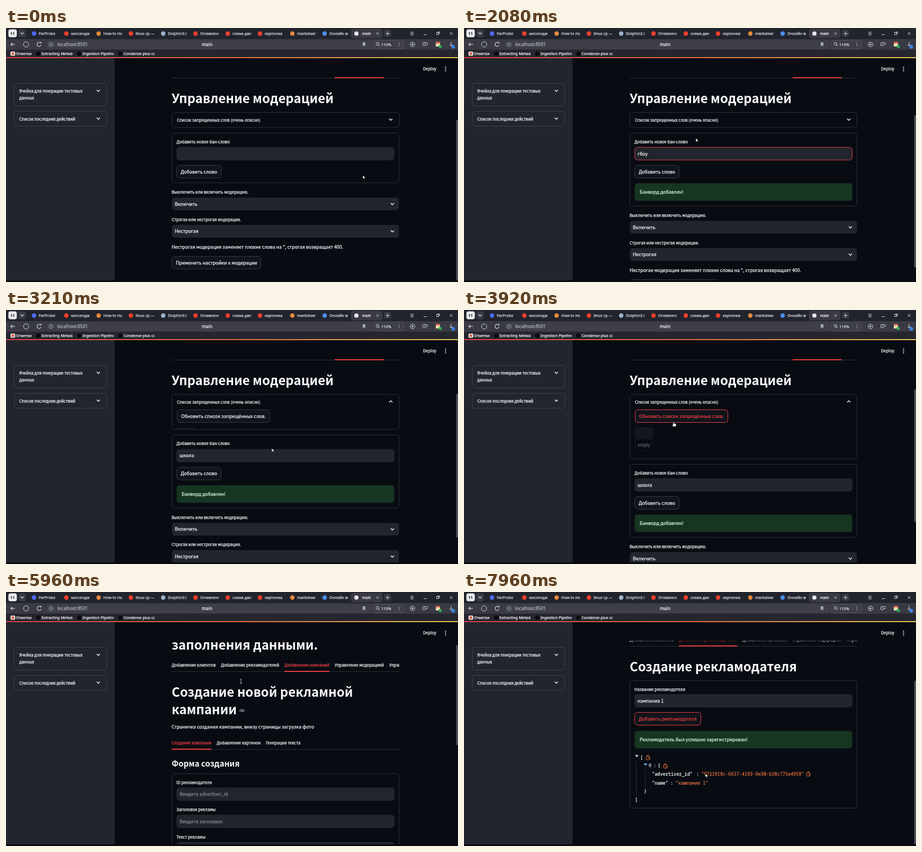
These frames come from a looping animation (854x480 px, 8 s). An HTML page with a canvas:

```html
<!DOCTYPE html>
<html lang="ru">
<head>
<meta charset="utf-8">
<title>main</title>
<style>
html, body { margin: 0; width: 100%; height: 100%; overflow: hidden; background: #080c12; }
canvas { display: block; width: 854px; height: 480px; }
</style>
</head>
<body>
<canvas id="stage" width="854" height="480"></canvas>
<script>
const LOOP = 8000;
const c = document.getElementById('stage').getContext('2d');
const BG = '#080c12', PANEL = '#22252d', EDGE = '#2b2f37', INK = '#f8f9fa', RED = '#e83f41',
      GREEN = '#163622', ORANGE = '#e8703a', DIM = '#858991';
const UI = '"Noto Sans", "Open Sans", sans-serif';
const MONO = '"Noto Sans Mono", "DejaVu Sans Mono", monospace';
const TOP = 57, BOTTOM = 477, HEADER = 92.5;

// Page typeface: use the CJK family only if its Cyrillic is proportional.
const measure = (str, font) => { c.font = font; return c.measureText(str).width; };
const CJK = '"Noto Sans CJK JP", "Noto Sans", sans-serif';
const PAGE = Math.abs(measure('г', '100px ' + CJK) - measure('ш', '100px ' + CJK)) < 9 ? UI : CJK;
// Size adjustment per weight, like CSS size-adjust.
const adjust = {
  400: 33.1 / measure('Нестрогая модерация заменяет плохие слова на *, строгая возвращает 400.', '400 1000px ' + PAGE) * 1000,
  700: 11.38 / measure('Управление модерацией', '700 1000px ' + PAGE) * 1000
};
const SMALL = 8.56, BODY = 9.79, TITLE = 26.9;

function put(str, x, y, size, color = INK, font = UI, weight = 400) {
  c.font = `${weight} ${size}px ${font}`;
  c.fillStyle = color;
  c.fillText(str, x, y);
  if (weight === 400) {
    // A hairline outline gives small text its slightly heavier look.
    c.strokeStyle = color;
    c.lineWidth = .25;
    c.strokeText(str, x, y);
  }
}
// y is the middle of the capitals
const text = (str, x, y, size = BODY, color = INK, weight = 400) =>
  put(str, x, y + size * .33, size * adjust[weight], color, PAGE, weight);
const ui = (str, x, y, size = 7, color = '#dddee2') => put(str, x, y + size * .35, size, color);
const mono = (str, x, y, color = INK) => put(str, x, y + 3, 8.55, color, MONO);

function rect(x, y, w, h, fill) { c.fillStyle = fill; c.fillRect(x, y, w, h); }
function box(x, y, w, h, fill, stroke, r = 5) {
  c.beginPath();
  c.roundRect(x + .5, y + .5, w - 1, h - 1, r);
  if (fill) { c.fillStyle = fill; c.fill(); }
  if (stroke) { c.strokeStyle = stroke; c.lineWidth = 1; c.stroke(); }
}
function line(points, color = INK, width = 1) {
  c.beginPath();
  points.forEach(([x, y]) => c.lineTo(x, y));
  c.strokeStyle = color; c.lineWidth = width; c.stroke();
}
function shape(points, fill, stroke) {
  c.beginPath();
  points.forEach(([x, y]) => c.lineTo(x, y));
  c.closePath();
  c.fillStyle = fill; c.fill();
  if (stroke) { c.strokeStyle = stroke; c.lineWidth = .8; c.stroke(); }
}
function dot(x, y, r, fill, stroke) {
  c.beginPath();
  c.arc(x, y, r, 0, Math.PI * 2);
  if (fill) { c.fillStyle = fill; c.fill(); }
  if (stroke) { c.strokeStyle = stroke; c.lineWidth = 1; c.stroke(); }
}
function clipped(x, y, w, h, draw) {
  c.save();
  c.beginPath(); c.rect(x, y, w, h); c.clip();
  draw();
  c.restore();
}
const chevron = (x, y, up, color = INK) => {
  const d = up ? -1.5 : 1.5;
  line([[x - 3, y - d], [x, y + d], [x + 3, y - d]], color, 1.4);
};

// ---- Time helpers ----
function track(t, keys) {
  const i = keys.findIndex(k => k[0] > t);
  if (i < 0) return keys[keys.length - 1].slice(1);
  if (i === 0) return keys[0].slice(1);
  const a = keys[i - 1], b = keys[i], p = (t - a[0]) / (b[0] - a[0]);
  const e = p * p * (3 - 2 * p);
  return a.slice(1).map((v, n) => v + (b[n + 1] - v) * e);
}
const typed = (str, t, from, to) =>
  str.slice(0, Math.max(0, Math.ceil((t - from) / (to - from) * str.length)));
const between = (t, a, b) => t >= a && t < b;

const SCROLL = [[0, 167], [5040, 167], [5240, 0], [5790, 0], [5950, 111], [6250, 111], [6440, 0],
  [7620, 0], [7830, 159]];
const POINTER = [[0, 674, 278], [100, 674, 278], [420, 450, 238], [1620, 450, 238], [1900, 438, 208],
  [2850, 438, 208], [3090, 500, 176], [3130, 500, 176], [3205, 502, 261], [3260, 502, 261],
  [3700, 396, 211], [4250, 396, 211], [4650, 430, 300], [5020, 430, 300], [5260, 505, 190],
  [5320, 505, 190], [5540, 568, 250], [5680, 568, 250], [5920, 444, 169], [6250, 444, 169],
  [6520, 461, 250], [6640, 461, 250], [6830, 440, 365], [7330, 440, 365], [7460, 385, 400],
  [7600, 385, 400], [7900, 456, 343]];
const CARETS = [[330, 1680], [5230, 5430], [5850, 6400], [6800, 7370]];
const HANDS = [[3060, 3170], [3600, 4380], [5470, 5730], [6480, 6690], [7420, 7680]];
const during = (spans, t) => spans.some(([a, b]) => between(t, a, b));

// ---- Page widgets ----
function button(label, x, y, w, hot) {
  box(x, y, w, 25, '#10141c', hot ? RED : '#343840');
  text(label, x + 8, y + 12.5, BODY, hot ? RED : INK);
}
function input(y, value, focus, hint) {
  box(322, y, 412, 25, PANEL, focus ? '#d24040' : PANEL);
  text(value || hint || '', 328, y + 12.5, BODY, value ? INK : DIM);
}
function select(label, value, y) {
  text(label, 313, y, SMALL);
  box(313, y + 9.5, 430, 25, PANEL);
  text(value, 319, y + 22, BODY);
  chevron(730, y + 22);
}
function alertBox(label, y) {
  box(322, y, 412, 34, GREEN);
  text(label, 332, y + 17, BODY, '#e2f7e6');
}
function tabs(items, y, active) {
  rect(313, y + 12, 430, 1, EDGE);
  clipped(313, y - 10, 430, 30, () => items.forEach(([x, label], i) => {
    text(label, x, y, SMALL, i === active ? RED : INK);
    if (i === active) rect(x, y + 11, c.measureText(label).width, 2, RED);
  }));
}
function linkIcon(x, y) {
  box(x - 5, y - 2.5, 6, 5, null, '#9a9ca2', 2.5);
  box(x - 1, y - 2.5, 6, 5, null, '#9a9ca2', 2.5);
  rect(x - 2.5, y - .5, 5, 1, '#9a9ca2');
}
function clipboard(x, y) {
  box(x - 4, y - 3.5, 7, 8, null, ORANGE, 1);
  rect(x - 2, y - 4.5, 3, 2, ORANGE);
  line([[x + 4, y + 1], [x - 1, y + 1]], ORANGE);
}

function pageHead(t, active) {
  tabs([[313, 'Страница аналитики'], [402, 'Добавление данных'], [487, 'Информация / Инструкция']], 127, 1);
  box(317, 164, 28, 28, '#e8edf0', '#c3ccd2', 2);
  rect(319, 171, 7, 19, '#2fa56b');
  rect(327, 178, 7, 12, '#e0484c');
  rect(336, 167, 7, 23, '#3d94d6');
  text('KVUN', 356, 179, TITLE, INK, 700);
  text('- Дашборд для', 429, 179, TITLE, INK, 700);
  text('заполнения данными.', 313, 211, TITLE, INK, 700);
  if (between(t, 5230, 5400)) linkIcon(599, 213);
  tabs([[313, 'Добавление клиентов'], [406, 'Добавление рекламодателей'], [526, 'Добавление кампаний'],
    [621, 'Управление модерацией'], [724, 'Управление показами']], 249, active);
}

function wordTable(filled) {
  const y = 389, row = 21.4;
  if (!filled) {
    box(323, y, 34, 44, null, '#15181f', 3);
    rect(324, y + 1, 32, 21, '#14161d');
    return text('empty', 328, y + 33, SMALL + .4, '#5d6067');
  }
  box(323, y, 80, row * 5, BG, EDGE, 3);
  rect(324, y + 1, 78, row - 1, '#191c23');
  rect(357, y, 1, row * 5, EDGE);
  text('banwords', 361, y + 11, SMALL, DIM);
  ['prooood', 'гбоу', 'сош', 'школа'].forEach((word, i) => {
    const mid = y + row * (i + 1.52);
    rect(323, y + row * (i + 1), 80, 1, EDGE);
    text(String(i), 347, mid, SMALL, DIM);
    text(word, 361, mid, SMALL);
  });
}

function moderation(t) {
  const filled = t >= 4080, alert = t >= 1790;
  const open = Math.min(1, Math.max(0, (t - 3130) / 200));
  const grown = open * 93 + (filled ? 63 : 0);
  text('Управление модерацией', 313, 300.5, TITLE, INK, 700);

  box(313, 326, 430, 29.5 + grown, null, EDGE);
  text('Список запрещенных слов (очень опасно)', 323, 341, SMALL);
  chevron(727, 340, open > 0);
  if (open > 0) clipped(314, 350, 428, 4 + grown, () => {
    button('Обновить список запрещённых слов.', 323, 355, 176, t >= 3610);
    wordTable(filled);
  });

  c.save();
  c.translate(0, grown);
  box(313, 365, 430, alert ? 139 : 95, null, EDGE);
  text('Добавить новое бан-слово', 322, 382, SMALL);
  const word = t < 2250 ? typed('гбоу', t, 850, 1550)
    : t < 2580 ? typed('сош', t, 2250, 2400) : typed('школа', t, 2580, 2840);
  input(392, word, between(t, 440, 3130));
  button('Добавить слово', 322, 426, 85);
  if (alert) { alertBox('Банворд добавлен!', 460); c.translate(0, 44); }
  select('Выключить или включить модерацию.', 'Включить', 477.5);
  select('Строгая или нестрогая модерация.', 'Нестрогая', 529);
  text('Нестрогая модерация заменяет плохие слова на *, строгая возвращает 400.', 313, 581);
  button('Применить настройки к модерации', 313, 598, 169);
  c.restore();
  return 585 + (alert ? 44 : 0) + grown;
}

function campaign(t) {
  text('Создание новой рекламной', 313, 300.5, TITLE, INK, 700);
  text('кампании', 313, 333, TITLE, INK, 700);
  if (between(t, 5860, 6300)) linkIcon(446, 335);
  text('Страничка создания кампании, внизу страницы загрузка фото', 313, 366);
  tabs([[313, 'Создание кампании'], [398, 'Добавление картинок'], [491, 'Генерация текста']], 396, 0);
  text('Форма создания', 313, 435, 17, INK, 700);
  box(313, 454, 430, 400, null, EDGE);
  [['ID рекламодателя', 'Введите advertiser_id'], ['Заголовок рекламы', 'Введите заголовок'],
    ['Текст рекламы', 'Введите текст']].forEach(([label, hint], i) => {
    const y = 471 + i * 51.4;
    text(label, 322, y, SMALL);
    input(y + 9.5, '', false, hint);
  });
  return 957;
}

function advertiser(t) {
  const done = t >= 7550;
  text('Создание рекламодателя', 313, 300.5, TITLE, INK, 700);
  box(313, 326, 430, done ? 242 : 95, null, EDGE);
  text('Название рекламодателя', 322, 343, SMALL);
  input(352, typed('кампания 1', t, 6900, 7320), between(t, 6850, 7490));
  button('Добавить рекламодателя', 322, 386, 126, t >= 7420);
  if (!done) return 430;

  alertBox('Рекламодатель был успешно зарегистрирован!', 421);
  rect(325, 478, 1, 66, EDGE);
  rect(342, 494, 1, 36, EDGE);
  shape([[323, 467], [330, 467], [326.5, 471.5]], '#a9c6d8');
  shape([[339.5, 483], [346.5, 483], [343, 487.5]], '#55b4e4');
  mono('[', 333, 472); clipboard(348, 472);
  mono('0', 349, 487, '#b7bac0'); mono(':', 358, 487); mono('{', 366, 487); clipboard(381, 488);
  mono('"advertiser_id"', 355, 503); mono(':', 439, 503);
  mono('"9721918c-6637-4193-9e30-b38c775e4958"', 448, 503, ORANGE); clipboard(651, 503);
  mono('"name"', 355, 520); mono(':', 390, 520); mono('"кампания 1"', 400, 520, ORANGE);
  mono('}', 340, 536); mono(']', 323, 552);
  return 586;
}

function page(t) {
  rect(205, TOP, 649, 423, BG);
  const [scroll] = track(t, SCROLL);
  c.save();
  c.translate(0, -scroll);
  const view = t < 5600 ? moderation : t < 6600 ? campaign : advertiser;
  pageHead(t, view === moderation ? 3 : view === campaign ? 2 : 1);
  const height = view(t);
  c.restore();
  if (height > 430)
    box(850, 50 + scroll * 430 / height, 5, 430 * 423 / height, '#4b4e56', null, 2);
  rect(205, TOP, 649, HEADER - TOP, BG);
  text('Deploy', 788, 77.5, SMALL);
  [-3.5, 0, 3.5].forEach(d => dot(830.5, 77.5 + d, 1.1, INK));
}

function sidebar() {
  rect(0, TOP, 205, 423, PANEL);
  box(15, 104, 176, 44, null, '#41444c');
  text('Ячейка для генерации тестовых', 25, 119.5, SMALL);
  text('данных', 25, 132.5, SMALL);
  chevron(174.5, 118.5);
  box(15, 157, 176, 29, null, '#41444c');
  text('Список последних действий', 25, 172, SMALL);
  chevron(174.5, 171);
}

// ---- Browser frame ----
const SITE = '#f0402c', ASK = '#e58a3c';
const STRIP = '#22242d', BAR = '#393a43', FIELD = '#3e3f48', MARKS = '#25262e';
const BROWSER_TABS = ['FarProbe #4d6bfe', 'мессенджер ' + SITE, 'How to make ' + ASK, 'linux cp — ' + SITE,
  'Dolphin3.0 #9fb4cf', 'Оглавление ' + SITE, 'схема данных ' + SITE, 'картинка к ' + SITE,
  'markdown ' + ASK, 'Онлайн вид #4b8ff0'];

function browser() {
  const pale = '#d3d5da';
  rect(0, 0, 854, 21, STRIP);
  rect(0, 21, 854, 20, BAR);
  rect(0, 41, 854, 15, MARKS);
  box(4, 2, 17, 16, '#e9eaec', null, 4);
  put('11', 8, 12.7, 7.5, '#17181e', UI, 700);
  box(23, 2, 15, 16, BAR, null, 4);
  chevron(30.5, 10, false, pale);
  BROWSER_TABS.forEach((entry, i) => {
    const cut = entry.lastIndexOf(' '), x = 53 + i * 61;
    dot(x, 10.5, 4.2, entry.slice(cut + 1));
    clipped(x + 8, 2, 36, 18, () => ui(entry.slice(0, cut), x + 9, 10.5, 7.3));
  });
  box(651, 1, 61, 19, BAR, null, 5);
  dot(662, 10.5, 4, '#e6e7e9');
  ui('main', 673, 10.5, 7, '#fff');
  const cross = (x, y, r) => {
    line([[x - r, y - r], [x + r, y + r]], pale);
    line([[x - r, y + r], [x + r, y - r]], pale);
  };
  cross(702, 10.5, 2);
  box(714, 3, 14, 14, BAR, null, 4);
  line([[717.5, 10.5], [724.5, 10.5]], pale);
  line([[721, 7], [721, 14]], pale);
  [8, 10.5, 13].forEach(y => line([[764, y], [770, y]], pale));
  line([[789, 12.5], [795, 12.5]], pale);
  box(813, 8, 5, 5, null, pale, 0);
  line([[815, 7.5], [819, 7.5], [819, 11.5]], pale);
  cross(841, 10.5, 2.5);

  line([[17, 31], [9, 31]], pale, 1.2);
  line([[12, 28], [9, 31], [12, 34]], pale, 1.2);
  dot(38, 31, 5, null, pale);
  c.beginPath(); c.arc(62.5, 31, 3.8, .2, 5.3); c.strokeStyle = pale; c.lineWidth = 1.2; c.stroke();
  shape([[63.5, 28.5], [67, 29], [66.5, 25.5]], pale);
  box(77, 23, 614, 17, FIELD, null, 5);
  dot(85, 31, 4, null, '#8f929a');
  line([[81, 31], [89, 31]], '#8f929a', .8);
  line([[85, 27], [85, 35]], '#8f929a', .8);
  ui('localhost:8501', 97, 31, 8.5, '#b4b6bc');
  ui('main', 370, 31, 8.4, INK);
  shape([[674, 27], [679, 27], [679, 35], [676.5, 32.5], [674, 35]], '#a5a7ad');
  box(693, 23, 59, 17, FIELD, '#50515a', 5);
  dot(702, 30, 2.6, null, pale);
  line([[704, 32], [706, 34.5]], pale);
  ui('110%', 709, 31, 7.4);
  [-2.5, 0, 2.5].forEach(d => dot(742.5, 31 + d, .7, pale));
  dot(768, 31, 4.4, null, pale);
  shape([[766.5, 28.5], [766.5, 33.5], [770.5, 31]], pale);
  box(787, 27, 6, 7, null, pale, 1);
  box(791, 27, 6, 5, BAR, pale, 1);
  rect(812, 26, 8, 9, '#e6d9b0');
  rect(812, 26, 8, 3, '#d9604c');
  dot(820.5, 35, 3, '#33a852');
  line([[841, 26], [841, 33]], pale);
  line([[838, 31], [841, 34], [844, 31]], pale);
  dot(845, 35.5, 3.4, '#3b82e6');

  box(8, 44, 10, 9, '#e9e4e0', null, 2);
  dot(13, 48.5, 2.5, '#e0553c');
  ui('Отметки', 19, 48.5, 7, INK);
  ['Extracting Metadata', 'Ingestion Pipeline', 'Condense plus context'].forEach((label, i) => {
    const x = 61 + i * 77.5;
    dot(x, 48.5, 4.3, '#0b0b0e');
    clipped(x + 5, 42, 60, 14, () => ui(label, x + 6, 48.5, 7.3, INK));
  });

  const glow = c.createLinearGradient(0, 0, 854, 0);
  glow.addColorStop(0, '#d93f45');
  glow.addColorStop(.5, '#e2703f');
  glow.addColorStop(1, '#e6c65a');
  rect(0, 55, 854, 2, glow);
  rect(0, BOTTOM, 854, 3, '#090a10');
}

function pointer(t) {
  const [x, y] = track(t, POINTER);
  if (during(CARETS, t)) {
    line([[x, y - 3.5], [x, y + 3.5]], '#c8cace');
    line([[x - 1.5, y - 4], [x + 1.5, y - 4]], '#c8cace');
    line([[x - 1.5, y + 4], [x + 1.5, y + 4]], '#c8cace');
  } else if (during(HANDS, t)) {
    shape([[x - 1, y], [x + .8, y], [x + .8, y + 3], [x + 5, y + 4.2], [x + 5, y + 7],
      [x + 3.6, y + 9.5], [x - .8, y + 9.5], [x - 3, y + 5.5], [x - 1, y + 5.5]], '#fff', '#111');
  } else {
    shape([[x, y], [x, y + 7.2], [x + 1.7, y + 5.8], [x + 2.8, y + 8.2], [x + 4, y + 7.6],
      [x + 3, y + 5.4], [x + 5.1, y + 5.2]], '#fff', '#111');
  }
}

const start = performance.now();
function frame() {
  const t = (performance.now() - start) % LOOP;
  page(t);
  sidebar();
  browser();
  pointer(t);
  requestAnimationFrame(frame);
}
frame();
</script>
</body>
</html>
```
